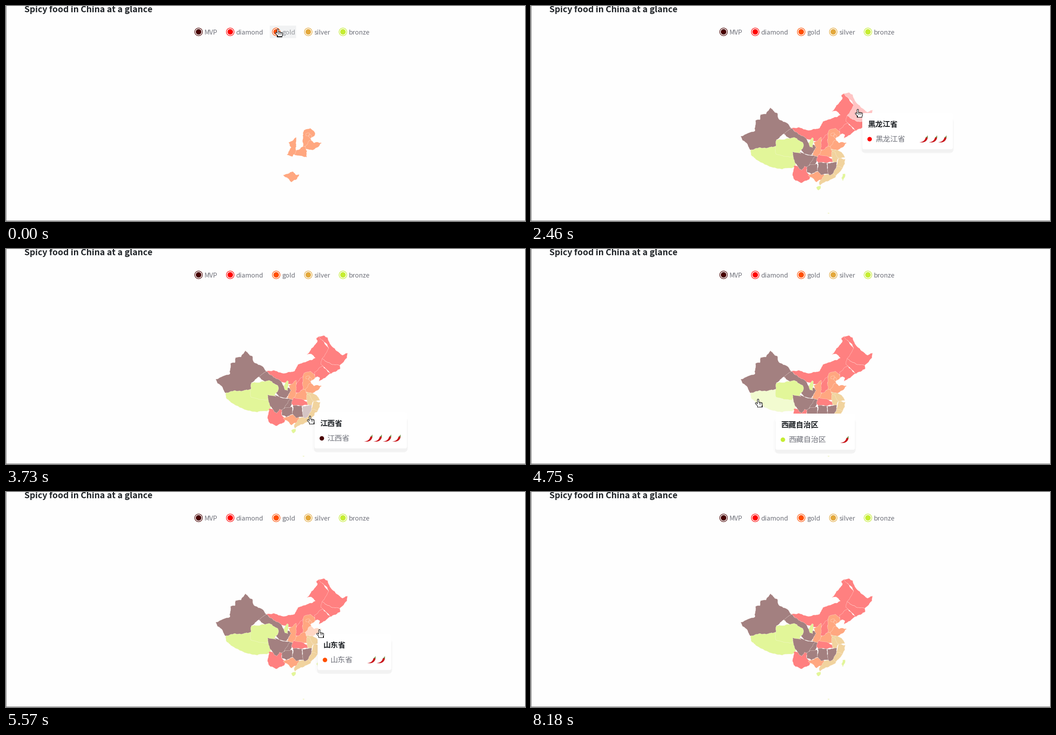
A matplotlib script for the animation above (8720 ms loop, 1161 by 482 pixels).

```python
import random

import matplotlib.pyplot as plt
import numpy as np
from matplotlib.animation import FuncAnimation
from matplotlib.patches import Circle, FancyBboxPatch, PathPatch, Polygon, Rectangle
from matplotlib.path import Path
from matplotlib.transforms import Affine2D

W, H, DPI = 1161, 482, 64
LOOP, INTERVAL, TICKS = 8720, 40, 65
PX = 72 / DPI
FONT = "Noto Sans CJK JP"
INK, GREY, PAPER = "#212529", "#6e7079", "#fefefe"

# tier: colour, chilies
TIERS = {"MVP": ("#480000", 4), "diamond": ("#ff0000", 3), "gold": ("#ff4f00", 2),
         "silver": ("#e3a83c", 1), "bronze": ("#c5ed32", 1)}

fig = plt.figure(figsize=(W / DPI, H / DPI), dpi=DPI, facecolor=PAPER)
ax = fig.add_axes([0, 0, 1, 1])
ax.set_xlim(0, W)
ax.set_ylim(H, 0)
ax.axis("off")


def text(x, y, s, size, color, z=3, **kw):
    return ax.text(x, y, s, fontsize=size * PX, color=color, family=FONT,
                   va="baseline", zorder=z, **kw)


def tint(color, alpha):
    rgb = np.array([int(color[i:i + 2], 16) for i in (1, 3, 5)]) / 255
    return tuple(1 - alpha * (1 - rgb))


def rough_edge(p, q, depth=3):
    """Points from p up to q with a jagged middle, the same in both directions."""
    length = np.hypot(q[0] - p[0], q[1] - p[1])
    if depth == 0 or length < 3:
        return [p]
    rnd = random.Random(str(sorted([p, q])))
    jitter = min(0.13 * length, 1.2)
    mid = ((p[0] + q[0]) / 2 + rnd.uniform(-jitter, jitter),
           (p[1] + q[1]) / 2 + rnd.uniform(-jitter, jitter))
    return rough_edge(p, mid, depth - 1) + rough_edge(mid, q, depth - 1)


provinces = {}


def province(name, tier, *corners):
    outline = sum((rough_edge(p, q) for p, q in zip(corners, corners[1:] + corners[:1])), [])
    patch = ax.add_patch(Polygon(outline, lw=0.5 * PX, joinstyle="round", zorder=2))
    provinces[name] = patch, tier


# Later provinces overlap earlier ones, so each shared border is given once
province("西藏自治区", "bronze", (500, 312), (560, 312), (592, 335), (592, 356), (589, 362),
         (562, 366), (530, 358), (503, 344), (492, 333), (491, 321))
province("内蒙古自治区", "diamond", (582, 274), (600, 272), (621, 279), (645, 274), (653, 259),
         (684, 249), (692, 244), (682, 235), (673, 237), (688, 219), (697, 206), (694, 200),
         (700, 195), (722, 222), (709, 262), (680, 290), (640, 304), (600, 295))
province("甘肃省", "MVP", (563, 285), (582, 274), (598, 287), (612, 294), (622, 309), (637, 313),
         (638, 317), (628, 334), (612, 332), (585, 305))
province("新疆维吾尔自治区", "MVP", (535, 228), (551, 240), (554, 253), (575, 264), (582, 274),
         (563, 288), (549, 300), (552, 314), (530, 318), (512, 317), (491, 323), (485, 312),
         (473, 301), (469, 292), (501, 280), (502, 257), (512, 255), (514, 243), (526, 242))
province("青海省", "bronze", (549, 300), (572, 297), (590, 295), (608, 306), (610, 314),
         (601, 326), (604, 331), (588, 331), (584, 339), (560, 335), (548, 332), (547, 316))
province("云南省", "diamond", (588, 358), (617, 358), (617, 372), (626, 382), (622, 389),
         (604, 397), (591, 391), (585, 380))
province("四川省", "MVP", (585, 327), (604, 331), (601, 326), (618, 334), (637, 336), (634, 350),
         (617, 361), (612, 359), (606, 368), (600, 365), (590, 350))
province("贵州省", "MVP", (617, 361), (626, 354), (640, 354), (642, 370), (628, 377), (617, 372))
province("重庆市", "MVP", (637, 336), (644, 341), (636, 355), (622, 357), (630, 346))
province("黑龙江省", "diamond", (699, 196), (712, 194), (720, 199), (728, 217), (744, 231),
         (752, 238), (765, 233), (763, 243), (747, 261), (727, 258), (707, 246), (722, 222),
         (715, 211))
province("辽宁省", "diamond", (709, 262), (726, 279), (708, 292), (700, 297), (702, 289),
         (696, 286), (690, 290), (690, 276))
province("吉林省", "diamond", (707, 246), (727, 258), (747, 261), (748, 268), (726, 280),
         (704, 258))
province("河北省", "gold", (664, 285), (667, 278), (681, 274), (690, 282), (691, 289), (681, 297),
         (683, 303), (669, 318), (662, 312))
province("北京市", "gold", (671, 286), (679, 285), (677, 292), (671, 291))
province("天津市", "gold", (680, 287), (684, 292), (681, 297), (677, 292))
province("河南省", "gold", (645, 329), (655, 320), (664, 314), (671, 316), (675, 325), (673, 339),
         (660, 338), (644, 334))
province("陕西省", "gold", (649, 294), (641, 302), (632, 306), (638, 317), (628, 333), (641, 338),
         (648, 327), (650, 318))
province("山西省", "diamond", (658, 290), (665, 286), (663, 302), (664, 315), (655, 322),
         (648, 323), (649, 305))
province("宁夏回族自治区", "bronze", (629, 295), (632, 297), (631, 308), (630, 318), (624, 316),
         (621, 307))
province("山东省", "gold", (669, 315), (677, 303), (683, 301), (690, 307), (697, 305), (706, 307),
         (694, 318), (686, 324), (671, 321))
province("江苏省", "silver", (671, 321), (686, 323), (695, 328), (702, 340), (688, 343),
         (674, 326))
province("浙江省", "silver", (688, 341), (703, 343), (702, 354), (697, 364), (683, 361))
province("安徽省", "silver", (674, 325), (680, 327), (688, 341), (684, 351), (673, 349),
         (672, 335))
province("湖北省", "diamond", (643, 333), (660, 336), (673, 342), (675, 350), (643, 352),
         (638, 346))
province("福建省", "silver", (683, 359), (697, 363), (692, 371), (681, 384), (674, 376))
province("广东省", "silver", (654, 378), (668, 376), (676, 375), (682, 383), (660, 393),
         (646, 402), (645, 394))
province("广西壮族自治区", "gold", (620, 379), (642, 371), (656, 378), (651, 388), (638, 395),
         (626, 384))
province("湖南省", "MVP", (642, 351), (662, 351), (665, 377), (648, 378), (641, 370))
province("江西省", "MVP", (662, 352), (684, 350), (683, 360), (675, 376), (668, 380), (664, 373))
province("海南省", "bronze", (638, 407), (648, 403), (648, 409), (642, 413))
province("台湾省", "bronze", (703, 376), (702, 384), (698, 392), (694, 386), (697, 377))
province("南海诸岛", "bronze", (663, 464), (668, 464), (666, 465.5))

# Static page parts
ax.add_patch(Rectangle((0, 0), 1, H, fc="#777777", zorder=4))
ax.add_patch(Rectangle((0, H - 1), W, 1, fc="#777777", zorder=4))
text(41, 14, "Spicy food in China at a glance", 19.2, INK, weight="bold")

legend = {}
x = 430.8
for tier, (color, _) in TIERS.items():
    ax.add_patch(Circle((x, 58), 8.6, fc="white", ec=color, lw=1.2 * PX, zorder=3))
    ax.add_patch(Circle((x, 58), 6.2, fc=color, lw=0, zorder=3))
    caption = text(x + 13, 63.6, tier, 14.4, GREY)
    right = caption.get_window_extent().transformed(ax.transData.inverted()).x1
    shade = ax.add_patch(Rectangle((x - 14, 44), right - x + 16, 28, fc="#f1f2f3", zorder=1))
    legend[tier] = shade, caption
    x = right + 28.7


def move(artists, x, y):
    for a in artists:
        a.set_transform(Affine2D().translate(x, y) + ax.transData)


def curved(points, color, z):
    codes = [Path.MOVETO] + [Path.CURVE4] * (len(points) - 1)
    return ax.add_patch(PathPatch(Path(points, codes), fc=color, lw=0, zorder=z))


def chili():
    body = curved([(0, 15), (7, 15.5), (12, 12), (14, 5), (15, 3.5), (18, 4), (18.5, 6),
                   (17, 13), (10, 18), (0, 15)], "#c9151b", 7)
    stem = curved([(14, 5.5), (16, 2), (17, 4), (18, 0), (19, 0), (18.5, 4), (19, 6),
                   (17, 4.5), (16, 4.5), (14, 5.5)], "#6d8f45", 8)
    return [body, stem]


def panel(radius, z, fc):
    return ax.add_patch(FancyBboxPatch((0, 0), 1, 1, fc=fc, lw=0, zorder=z,
                                       boxstyle=f"round,pad=0,rounding_size={radius}"))


# Tooltip
CJK = 16.8
shadows = [panel(9, 5, (0, 0, 0, a)) for a in (0.012, 0.034)]
box = panel(4, 6, "white")
heading = text(0, 0, "", CJK, INK, 7, weight="bold")
label = text(0, 0, "", CJK, GREY, 7)
dot = ax.add_patch(Circle((0, 0), 5, lw=0, zorder=7))
chilies = [chili() for _ in range(4)]
tooltip = shadows + [box, heading, label, dot]


def show_tooltip(name, x, y):
    for a in tooltip + sum(chilies, []):
        a.set_visible(False)
    if name not in provinces:
        return
    color, count = TIERS[provinces[name][1]]
    first = x + 60.6 + CJK * len(name)
    width, height = first + 21 * count + 12 - x, 81
    shadows[0].set_bounds(x - 5, y + 12, width + 8, height - 5)
    shadows[1].set_bounds(x - 1, y + 12, width + 2, height - 3)
    box.set_bounds(x, y, width, height)
    for item, dx, dy in ((heading, 12, 30.8), (label, 28.7, 64)):
        item.set_text(name)
        item.set_position((x + dx, y + dy))
    dot.center = x + 16.5, y + 58.5
    dot.set_facecolor(color)
    for i, parts in enumerate(chilies[:count]):
        move(parts, first + 21 * i, y + 50)
    for a in tooltip + sum(chilies[:count], []):
        a.set_visible(True)


# Hand pointer around its fingertip: wide black strokes under narrow white ones
fingers = [((0, 0), (2, 13)), ((-4, 0), (10, 14))]
fingers += [((2.9 * i, 2.9 * i), (8 + 0.7 * i, 14)) for i in (1, 2, 3)]
hand = [ax.plot(*finger, color=color, lw=width * PX, solid_capstyle="round", zorder=z)[0]
        for color, width, z in (("black", 4.2, 9), ("white", 2.1, 10)) for finger in fingers]
for color, inset, z in (("black", 0, 9), ("white", 1.1, 10)):
    hand.append(ax.add_patch(Rectangle((-1.6 + inset, 13), 11.6 - 2 * inset, 6 - inset,
                                       fc=color, lw=0, zorder=z)))

# Key points of the pointer's walk: screen tick, x, y
WALK = np.array([
    (2, 608, 50.5), (4, 683, 59), (8, 718, 60), (9, 735, 62), (10, 771, 60.5), (11, 771, 60.5),
    (14, 772, 108), (16, 753, 187), (17, 731, 228), (18, 731, 231), (23, 683, 288),
    (26, 680, 354), (27, 679.5, 374), (29, 655, 345), (32, 606, 345), (34, 537, 357),
    (35, 507.5, 336), (37, 530, 290), (40, 687, 306), (41, 700.5, 308), (44, 660, 326),
    (57, 654, 326), (60, 963, 463)])


def pointer(tick):
    return tuple(np.interp(tick, WALK[:, 0], WALK[:, i]) for i in (1, 2))


def hit(point):
    """Name of the legend entry or topmost province under a point."""
    for tier, (shade, _) in legend.items():
        if shade.get_bbox().contains(*point):
            return tier
    for name in reversed(provinces):
        if provinces[name][0].get_path().contains_point(point):
            return name
    return ""


def draw(frame):
    # The screen refreshes in ticks and answers the pointer one tick late
    tick = int((frame * INTERVAL + 25) * TICKS / LOOP)
    seen = pointer(tick - 1)
    hover = hit(seen)

    for name, (patch, tier) in provinces.items():
        shown = hover not in TIERS or hover == tier
        color = tint(TIERS[tier][0], 0.23 if name == hover else 0.5)
        patch.set_facecolor(color if shown else PAPER)
        patch.set_edgecolor((1, 0.97, 0.94, 0.7) if shown else PAPER)
    for tier, (shade, caption) in legend.items():
        shade.set_visible(tier == hover)
        caption.set_color("#95989d" if tier == hover else GREY)

    # Late in the walk the tooltip drifts over to the pointer's left
    drift = np.interp(tick, [42, 52], [0, 1])
    show_tooltip(hover, seen[0] + 10 - 55 * drift, seen[1] + 12 - 42 * drift)
    move(hand, *pointer(tick))
    for a in hand:
        a.set_visible(tick <= WALK[-1, 0])
    return []


anim = FuncAnimation(fig, draw, frames=LOOP // INTERVAL, interval=INTERVAL,
                     repeat=True, repeat_delay=0, blit=False)
plt.show()
```
